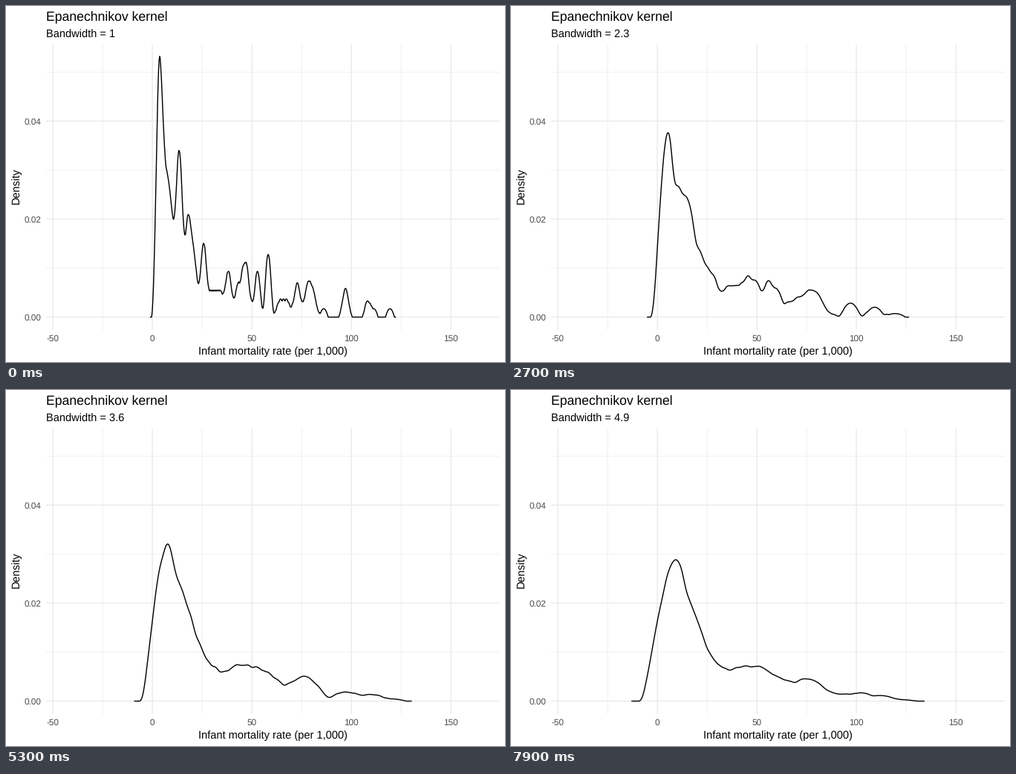
A matplotlib script that plays this animation: 672 px wide and 480 px high, repeating every 8 s.

```python
import numpy as np
import matplotlib.pyplot as plt
from matplotlib.animation import FuncAnimation

W, H, DPI = 672, 480, 96
FRAMES, INTERVAL = 80, 100
PX = 72 / DPI                      # points per pixel
LEFT, RIGHT, TOP, BOTTOM = 54.0, 664.7, 52.0, 437.0
INK, GREY, GRID = "black", "#4D4D4D", "#EBEBEB"

plt.rcParams.update({
    "font.family": "Liberation Sans",
    "text.hinting": "none",
    "path.snap": False,
})

# Groups of countries: lowest rate, highest rate, size (evenly spaced within).
GROUPS = [
    (1.8, 2.9, 11), (2.95, 4.85, 24), (5.1, 8, 19), (8.2, 10.1, 10),
    (10.3, 12.2, 7), (12.5, 14.6, 19), (14.9, 16.7, 5), (17, 19.6, 13),
    (20.3, 22.4, 7), (24.6, 26.5, 9), (27.3, 35.8, 10), (37.3, 39.3, 6),
    (41.6, 45.2, 6), (46, 47, 5), (48, 49, 3), (51.8, 53.8, 6),
    (57.3, 59.1, 8), (63, 68.8, 5), (71.5, 74.2, 5), (76.7, 80.9, 7),
    (82.2, 86.1, 2), (95.9, 98.2, 4), (107.7, 108.6, 2), (111.2, 119.4, 2),
]
rates = np.concatenate([np.linspace(*g) for g in GROUPS])


def density(bw, n=512):
    """Epanechnikov estimate whose kernel has standard deviation bw."""
    x = np.linspace(rates.min() - 3 * bw, rates.max() + 3 * bw, n)
    half = bw * np.sqrt(5)
    u = (x[:, None] - rates) / half
    y = 0.75 * np.clip(1 - u**2, 0, None).mean(axis=1) / half
    return x, y


def px(v):
    return 197.1 + 2.68 * np.asarray(v)


def py(d):
    return 419.5 - 6606 * np.asarray(d)


states = [np.array(density(1 + k / 10)) for k in range(FRAMES // 2 + 1)]

fig = plt.figure(figsize=(W / DPI, H / DPI), dpi=DPI, facecolor="white")
ax = fig.add_axes([0, 0, 1, 1])
ax.set(xlim=(0, W), ylim=(H, 0))
ax.axis("off")


def grid(xs, ys, width):
    style = dict(color=GRID, lw=width * PX, solid_capstyle="butt")
    for v in xs:
        ax.plot([px(v)] * 2, [TOP, BOTTOM], **style)
    for d in ys:
        ax.plot([LEFT, RIGHT], [py(d)] * 2, **style)


def label(x, y, s, size, color=INK, ha="left", **kw):
    return ax.text(x, y, s, fontsize=size, color=color, ha=ha,
                   va="baseline", **kw)


x_ticks = range(-50, 151, 50)
y_ticks = (0, 0.02, 0.04)
grid(range(-25, 126, 50), (0.01, 0.03, 0.05), 0.71)
grid(x_ticks, y_ticks, 1.42)

for v in x_ticks:
    label(px(v), 452, str(v), 8.8, GREY, "center")
for d in y_ticks:
    label(47.4, py(d) + 4.2, f"{d:.2f}", 8.8, GREY, "right")

label(54, 19.5, "Epanechnikov kernel", 13.2)
subtitle = label(54, 42.5, "", 11)
label((LEFT + RIGHT) / 2, 470, "Infant mortality rate (per 1,000)", 11,
      ha="center")
label(18, 243, "Density", 11, ha="center",
      rotation=90, rotation_mode="anchor")

curve, = ax.plot([], [], color=INK, lw=1.42 * PX,
                 solid_capstyle="butt", solid_joinstyle="round")


def update(i):
    k, part = divmod(i, 2)
    x, y = states[k] + (states[k + 1] - states[k]) * part / 2
    curve.set_data(px(x), py(y))
    subtitle.set_text(f"Bandwidth = {(10 + k) / 10:g}")
    return curve, subtitle


anim = FuncAnimation(fig, update, frames=FRAMES, interval=INTERVAL,
                     repeat=True, repeat_delay=0)
plt.show()
```
